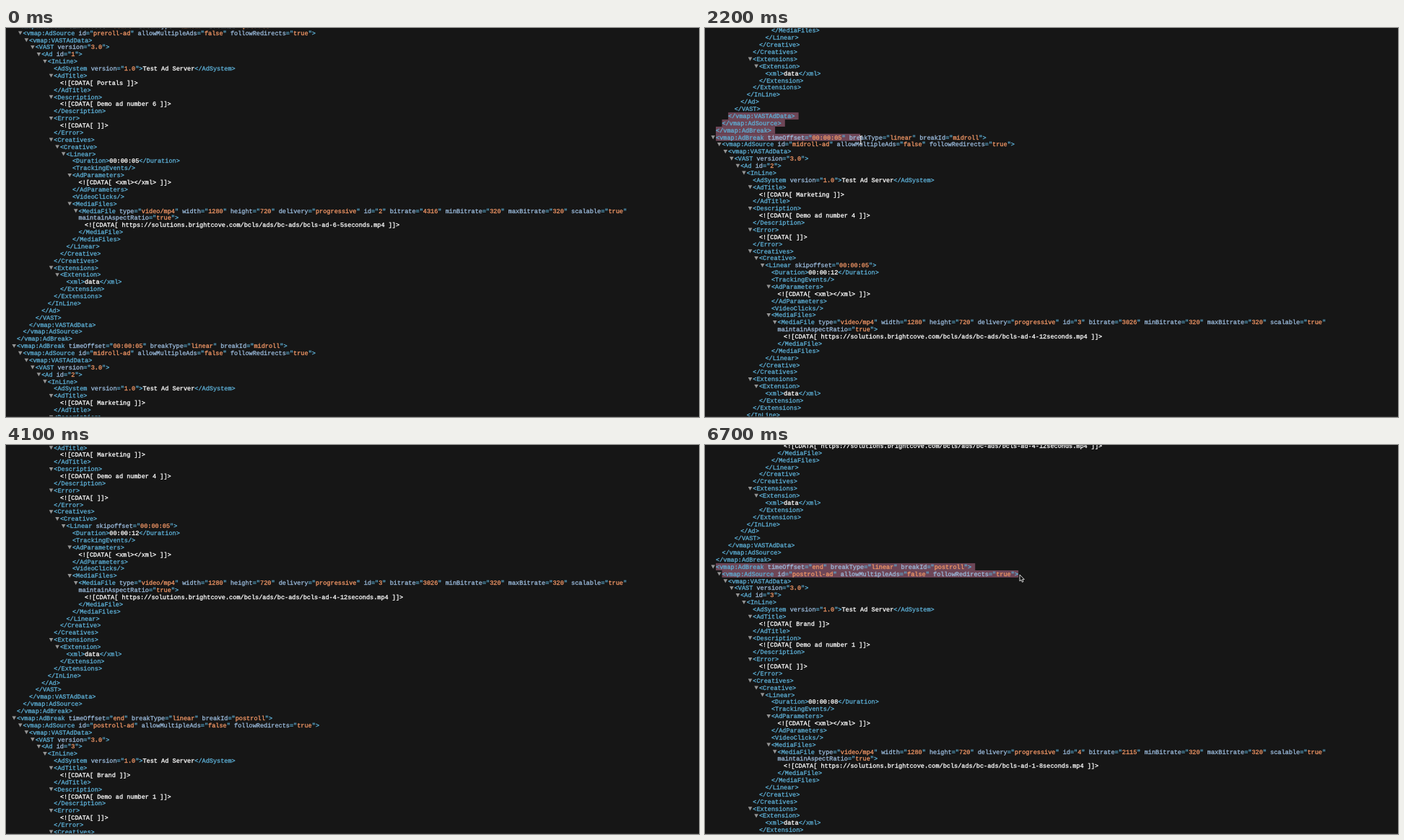
Write an HTML page that moves like this. It is 960x540 px and loops after 6830 ms.

```html
<!DOCTYPE html>
<html lang="en">
<head>
<meta charset="utf-8">
<title>VMAP document</title>
<style>
  html, body { margin: 0; width: 100%; height: 100%; overflow: hidden; background: #161616; }
  svg { display: block; width: 100%; height: 100%; }
  text {
    font: 8.552px "Liberation Mono", "Courier New", monospace;
    white-space: pre;
    text-rendering: geometricPrecision;
    stroke-width: .3px;
  }
  tspan { fill: #fff; stroke: #fff; }
  .tag { fill: #5db0d7; stroke: #5db0d7; }
  .name { fill: #9bbbdc; stroke: #9bbbdc; }
  .value { fill: #f29766; stroke: #f29766; }
  .fold { fill: #949494; }
  #marks { fill: #6e4657; }
</style>
</head>
<body>
<svg viewBox="0 0 960 540">
  <rect width="960" height="540" fill="#161616"/>
  <g id="page">
    <g id="marks"></g>
    <g id="lines"></g>
  </g>
  <rect y="539" width="960" height="1" fill="#2c2c2c"/>
  <g id="cursor">
    <path id="arrow" d="M0 0V9L2 7.2 3.4 10.3 5 9.6 3.6 6.6H6.3Z" fill="#111" stroke="#fff" stroke-width=".8"/>
    <path id="beam" d="M-2-6Q0-6 0-4.5Q0-6 2-6M0-4.5V4.5M-2 6Q0 6 0 4.5Q0 6 2 6" fill="none" stroke="#fff"/>
  </g>
</svg>
<script>
const LOOP = 6830, PITCH = 9.876, CHAR = 5.132, INDENT = 8.554, LEFT = 15;
const $ = id => document.getElementById(id);
const clamp = (v, lo, hi) => Math.min(hi, Math.max(lo, v));

function make(tag, attrs, parent) {
  const node = document.createElementNS('http://www.w3.org/2000/svg', tag);
  for (const key in attrs) node.setAttribute(key, attrs[key]);
  parent.append(node);
  return node;
}

// Document
const lines = [];
const add = (depth, text, fold = false) => lines.push({ depth, text, fold });
const cdata = text => depth => add(depth, `<![CDATA[ ${text}]]>`);

// Nested elements around a body; each tag is a name with optional attributes.
function nest(depth, [tag, ...inner], body) {
  if (!tag) return body(depth);
  add(depth, `<${tag}>`, true);
  nest(depth + 1, inner, body);
  add(depth, `</${tag.split(' ')[0]}>`);
}

function mediaFile(depth, ad) {
  add(depth, `<MediaFile type="video/mp4" width="1280" height="720" delivery="progressive" id="${ad.id + 1}"` +
    ` bitrate="${ad.bitrate}" minBitrate="320" maxBitrate="320" scalable="true"`, true);
  add(depth, 'maintainAspectRatio="true">');
  cdata(`https://solutions.brightcove.com/bcls/ads/bc-ads/bcls-ad-${ad.number}-${ad.seconds}seconds.mp4 `)(depth + 1);
  add(depth, '</MediaFile>');
}

function adBreak(ad) {
  const outer = [
    `vmap:AdBreak timeOffset="${ad.offset}" breakType="linear" breakId="${ad.roll}"`,
    `vmap:AdSource id="${ad.roll}-ad" allowMultipleAds="false" followRedirects="true"`,
    'vmap:VASTAdData', 'VAST version="3.0"', `Ad id="${ad.id}"`, 'InLine'
  ];
  nest(0, outer, d => {
    add(d, '<AdSystem version="1.0">Test Ad Server</AdSystem>');
    nest(d, ['AdTitle'], cdata(ad.title + ' '));
    nest(d, ['Description'], cdata(`Demo ad number ${ad.number} `));
    nest(d, ['Error'], cdata(''));
    nest(d, ['Creatives', 'Creative', 'Linear' + (ad.skip || '')], e => {
      add(e, `<Duration>00:00:${String(ad.seconds).padStart(2, '0')}</Duration>`);
      add(e, '<TrackingEvents/>');
      nest(e, ['AdParameters'], cdata('<xml></xml> '));
      add(e, '<VideoClicks/>');
      nest(e, ['MediaFiles'], m => mediaFile(m, ad));
    });
    nest(d, ['Extensions', 'Extension'], e => add(e, '<xml>data</xml>'));
  });
}

adBreak({ id: 1, roll: 'preroll', offset: 'start', title: 'Portals', number: 6, seconds: 5, bitrate: 4316 });
adBreak({ id: 2, roll: 'midroll', offset: '00:00:05', title: 'Marketing', number: 4, seconds: 12, bitrate: 3026,
  skip: ' skipoffset="00:00:05"' });
adBreak({ id: 3, roll: 'postroll', offset: 'end', title: 'Brand', number: 1, seconds: 8, bitrate: 2115 });

// Splits a line into coloured runs.
function tokens(text) {
  if (text.startsWith('<![')) return [['', text]];
  const runs = [];
  for (const [part] of text.matchAll(/<\/?[\w:]+|\w+="[^"]*"|\/?>| +(?=\w+=)|[^<>]+/g)) {
    const attr = part.match(/^(\w+)="(.*)"$/);
    if (attr) runs.push(['name', attr[1]], ['tag', '="'], ['value', attr[2]], ['tag', '"']);
    else runs.push([/^<|>$/.test(part) ? 'tag' : '', part]);
  }
  return runs;
}

lines.forEach((line, i) => {
  line.x = LEFT + line.depth * INDENT;
  line.end = line.x + line.text.length * CHAR;
  const y = i * PITCH;
  if (line.fold) make('path', { class: 'fold', d: `M${line.x - 6.6} ${y - 2.6}h5.6l-2.8 5.2z` }, $('lines'));
  const row = make('text', { x: line.x, y: y + 2.7 }, $('lines'));
  for (const [kind, part] of tokens(line.text)) make('tspan', { class: kind }, row).textContent = part;
});

// Motion: each step runs from start to end and then holds.
const scrollSteps = [
  { start: 30, end: 400, to: [-212.3] },
  { start: 530, end: 660, to: [-292.6] },
  { start: 3690, end: 4160, to: [-540.8] },
  { start: 4200, end: 4470, to: [-719.7] }
];
const pointerSteps = [
  { start: 30, end: 400, to: [957.5, 100] },
  { start: 860, end: 1240, to: [32, 122] },
  { start: 1240, end: 1360, to: [47, 131] },
  { start: 1400, end: 1760, to: [186, 153] },
  { start: 2000, end: 2600, to: [300, 163] },
  { start: 2800, end: 3100, to: [358.5, 169] },
  { start: 3130, end: 3460, to: [449, 172] },
  { start: 3500, end: 3501, to: [975, 200] },
  { start: 4200, end: 4430, to: [948, 311] },
  { start: 4460, end: 4740, to: [15, 169] },
  { start: 4740, end: 4860, to: [45, 179] },
  { start: 4900, end: 5700, to: [436, 180] }
];
const selections = [
  { start: 1240, end: 3500, anchor: 42 },
  { start: 4740, end: LOOP, anchor: 90 }
];

const linear = p => p;
const smooth = p => p * p * (3 - 2 * p);

function follow(steps, from, t, ease) {
  return steps.reduce((pos, { start, end, to }) => {
    const p = ease(clamp((t - start) / (end - start), 0, 1));
    return pos.map((v, i) => v + (to[i] - v) * p);
  }, from);
}

function drawSelection(anchor, focus, x) {
  for (let i = anchor; i <= focus; i++) {
    const line = lines[i], length = line.text.length;
    const chars = i < focus ? length + 1 : clamp(Math.round((x - line.x) / CHAR), 0, length);
    make('rect', { x: line.x, y: i * PITCH - 5, width: chars * CHAR, height: PITCH }, $('marks'));
  }
}

function draw(t) {
  const [top] = follow(scrollSteps, [-2.9], t, linear);
  const [x, y] = follow(pointerSteps, [975, 110], t, smooth);
  const row = clamp(Math.round((y - top) / PITCH), 0, lines.length - 1);
  const overText = x >= lines[row].x && x <= lines[row].end;

  $('page').setAttribute('transform', `translate(0 ${top})`);
  $('cursor').setAttribute('transform', `translate(${x} ${y})`);
  $('arrow').style.display = overText ? 'none' : '';
  $('beam').style.display = overText ? '' : 'none';

  $('marks').replaceChildren();
  const active = selections.find(s => t >= s.start && t < s.end);
  if (active) drawSelection(active.anchor, row, x);
}

const begin = performance.now();
function tick() {
  draw((performance.now() - begin) % LOOP);
  requestAnimationFrame(tick);
}
tick();
</script>
</body>
</html>
```
